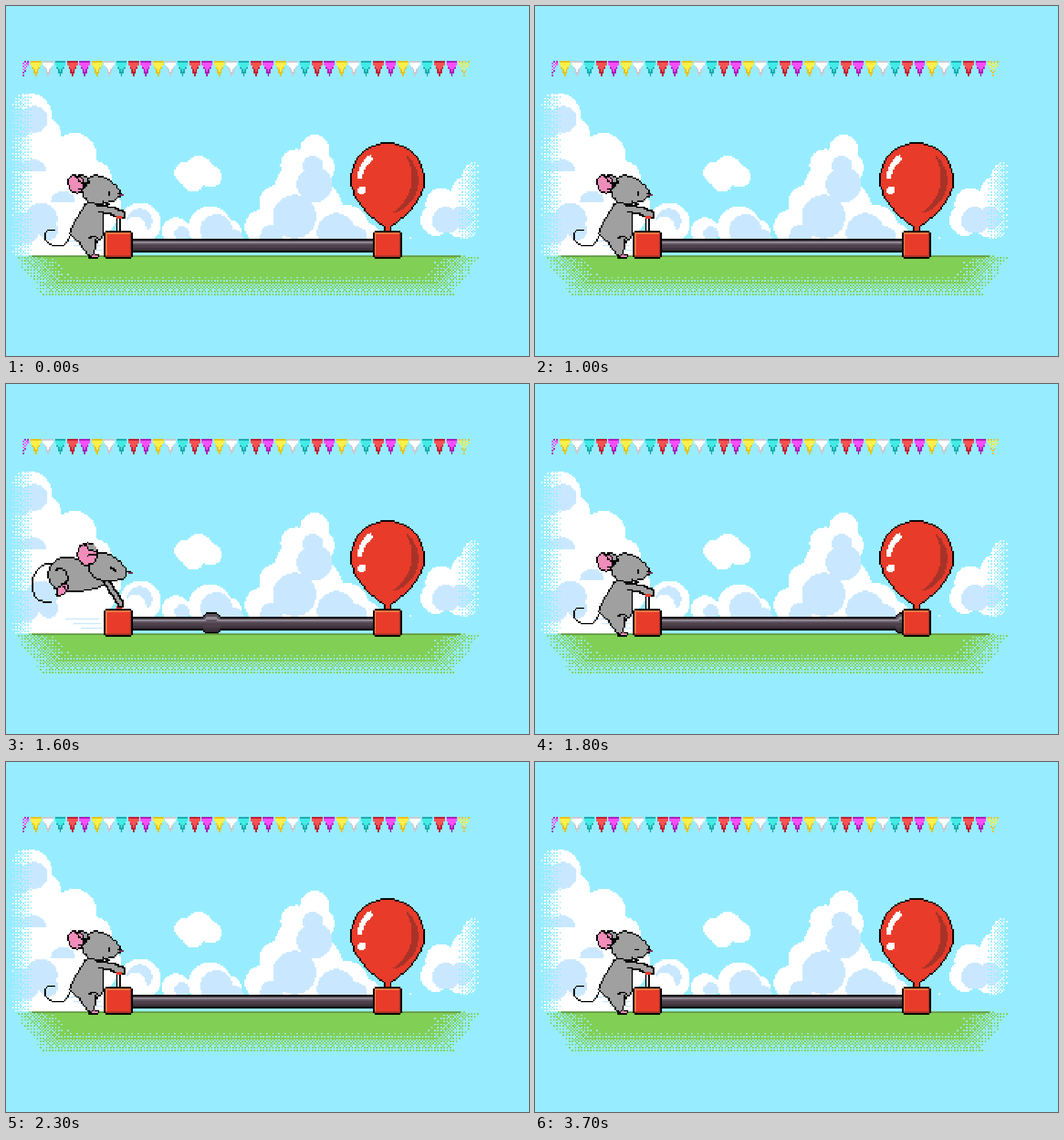
Animation of 915x612 px, one loop 3900 ms. Source, as an HTML page with a canvas:

```html
<!DOCTYPE html>
<html lang="en">
<head>
<meta charset="utf-8">
<title>Mouse and balloon</title>
<style>
html, body { margin: 0; width: 100%; height: 100%; overflow: hidden; background: #97edff; }
canvas { position: absolute; left: 0; top: 0; width: 915px; height: 612.66px; image-rendering: pixelated; }
</style>
</head>
<body>
<canvas id="stage" width="342" height="229"></canvas>
<script>
// Shapes use stage pixels; rect() and the pixel loops use art cells of P stage pixels.
const W = 342, H = 229, P = 915 / W, LOOP = 3900, { PI, sin, cos, abs, min, max, floor, round } = Math;
const SKY = '#97edff', WHITE = '#ffffff', MIST = '#c9e8ff', BLACK = '#000000', GREEN = '#82cf55';
const RED = '#e93b2a', DARK_RED = '#a73328', GREY = '#a0a0a0', PINK = '#f08dba';
const g = document.getElementById('stage').getContext('2d', { willReadFrequently: true });

const clamp = (v, a, b) => max(a, min(b, v));
const mix = (a, b, t) => a + (b - a) * t;
const rad = deg => deg * PI / 180;
const cell = v => floor(v / P);
const parse = s => s.trim().split(/\s+/).map(p => p.split(',').map(Number));

function rect(x, y, w, h, color) {
  g.fillStyle = color;
  g.fillRect(x, y, w, h);
}

// Ordered 4x4 dithering
function dither(x, y, density) {
  const level = (a, b) => 2 * ((a ^ b) & 1) + (b & 1);
  return density > (4 * level(x, y) + level(x >> 1, y >> 1) + .5) / 16;
}

// Catmull-Rom curve through key points
function curve(s, closed) {
  const pts = parse(s), n = pts.length, out = [];
  const at = i => closed ? pts[(i + n) % n] : pts[clamp(i, 0, n - 1)];
  for (let i = 0; i < (closed ? n : n - 1); i++) {
    const [a, b, c, d] = [at(i - 1), at(i), at(i + 1), at(i + 2)];
    for (let t = 0; t < 1; t += .2) {
      out.push([0, 1].map(k => b[k] + .5 * t * (c[k] - a[k] +
        t * (2 * a[k] - 5 * b[k] + 4 * c[k] - d[k] + t * (3 * (b[k] - c[k]) + d[k] - a[k])))));
    }
  }
  return closed ? out : [...out, pts[n - 1]];
}

function place(x, y, cx, cy, dir) {
  return [cx + x * cos(dir) - y * sin(dir), cy + x * sin(dir) + y * cos(dir)];
}

function oval(cx, cy, rx, ry = rx, tilt = 0) {
  return Array.from({ length: 24 }, (_, i) =>
    place(rx * cos(i * PI / 12), ry * sin(i * PI / 12), cx, cy, tilt));
}

// Round at the back, narrowing to a tip at distance len
function drop(cx, cy, r, len, dir, power) {
  const half = [];
  for (let a = 180; a > 90; a -= 7.5) half.push([r * cos(rad(a)), r * sin(rad(a))]);
  for (let u = 0; u <= 1; u += .0625) half.push([u * len, r * max(0, cos(u * PI / 2)) ** power]);
  const mirror = half.slice(1, -1).reverse().map(([x, y]) => [x, -y]);
  return [...half, ...mirror].map(([x, y]) => place(x, y, cx, cy, dir));
}

// Arc band with varying radius and width
function crescent(cx, cy, from, to, radius, width) {
  const side = k => Array.from({ length: 17 }, (_, i) => {
    const t = i / 16, a = rad(mix(from, to, t)), r = radius(t) + k * width(t) / 2;
    return [cx + r * cos(a), cy + r * sin(a)];
  });
  return [...side(1), ...side(-1).reverse()];
}

function fill(pts, color) {
  g.fillStyle = color;
  for (let y = 0; y < H; y++) {
    const sy = (y + .5) * P, hits = [];
    pts.forEach(([x1, y1], i) => {
      const [x2, y2] = pts[(i + 1) % pts.length];
      if (y1 <= sy !== y2 <= sy) hits.push(x1 + (sy - y1) / (y2 - y1) * (x2 - x1));
    });
    hits.sort((a, b) => a - b);
    for (let i = 0; i + 1 < hits.length; i += 2) {
      const a = round(hits[i] / P), b = round(hits[i + 1] / P);
      g.fillRect(a, y, b - a, 1);
    }
  }
}

function stroke(pts, color = BLACK, size = 1) {
  const o = size >> 1;
  g.fillStyle = color;
  for (let i = 0; i + 1 < pts.length; i++) {
    const [ax, ay, bx, by] = [...pts[i], ...pts[i + 1]].map(cell);
    const n = max(abs(bx - ax), abs(by - ay), 1);
    for (let k = 0; k <= n; k++) {
      g.fillRect(round(mix(ax, bx, k / n)) - o, round(mix(ay, by, k / n)) - o, size, size);
    }
  }
}

function outlined(pts, color) {
  fill(pts, color);
  stroke([...pts, pts[0]]);
}

const line = s => stroke(curve(s));

function limb(s, size) {
  const pts = curve(s);
  stroke(pts, BLACK, size + 2);
  stroke(pts, GREY, size);
}

// Union of "x,y,r" discs with a flat bottom, fading at both ends of the scene
function puffs(s, color, bottom) {
  g.fillStyle = color;
  for (const [cx, cy, r] of parse(s)) {
    for (let y = cell(cy - r); y < cell(min(cy + r, bottom)) + 1; y++) {
      for (let x = max(0, cell(cx - r)); x <= cell(cx + r); x++) {
        const sx = (x + .5) * P, sy = (y + .5) * P, fade = min((sx - 8) / 38, (828 - sx) / 36);
        if (Math.hypot(sx - cx, sy - cy) < r && dither(x, y, fade)) g.fillRect(x, y, 1, 1);
      }
    }
  }
}

function clouds() {
  puffs('40,192,40 66,224,30 40,240,55 120,260,38 155,300,29 60,310,90 140,350,60 30,390,75 110,410,75', WHITE, 434);
  puffs('50,198,23 22,206,26', MIST, 228);
  puffs('48,290,22 20,292,22', MIST, 287);
  puffs('100,345,22', MIST, 342);
  puffs('62,372,28 30,390,28 74,392,17', MIST, 413);
  for (let i = 0; i < 3; i++) rect(39 + 5 * i, 153 + 3 * i, 22 - 4 * i, 1, MIST);

  puffs('235,380,36 297,394,24 357,388,38 390,395,22 448,386,30', WHITE, 404);
  puffs('475,345,32 508,278,28 540,250,25 548,282,27 520,320,50 530,360,60 495,385,55 595,388,40 632,402,22', WHITE, 404);
  puffs('234,376,22', MIST, 390);
  puffs('226,387,19', WHITE, 404);
  puffs('308,398,13 368,392,28 400,405,14', MIST, 404);
  puffs('537,280,18 540,312,31 505,368,38 465,402,20 578,396,34 615,402,16', MIST, 404);

  puffs('338,286,24 315,292,20 358,298,19 328,306,19', WHITE, 404);
  puffs('752,374,27 762,346,28 808,328,30 824,298,26 800,370,36', WHITE, 404);
  puffs('770,375,24 796,370,20', MIST, 394);
  rect(264, 151, 1, 1, WHITE);
}

function grass() {
  g.fillStyle = GREEN;
  for (let y = 163; y < 189; y++) {
    for (let x = 0; x < W; x++) {
      const sx = x * P, sy = y * P, inset = max(0, sy - 440) * .7;
      const side = min(sx - 16 - inset, 826 - inset - sx) / 85;
      if (dither(x, y, min(side > 0 ? side + .12 : 0, (513 - sy) / 45))) g.fillRect(x, y, 1, 1);
    }
  }
  rect(17, 163, 280, 1, '#659f49');
}

function bunting() {
  const colors = [['#fff04a', '#e5c21a'], ['#ffffff', '#c9c9cf'], ['#44ebe6', '#19a9aa'],
    ['#f85252', '#bd1c32'], ['#f94ffb', '#a91bb5']];
  for (let i = -1; i < 36; i++) {
    const [main, edge] = colors[(i + 5) % 5];
    for (let r = 0; r < 10; r++) {
      const half = round(3.3 * (1 - r / 9));
      for (let d = -half; d <= half; d++) {
        const x = 19 + 8 * i + d, y = 36 + r, frayed = x < 14 || x > 296;
        if (x < 11 || frayed && !dither(x, y, .5)) continue;
        rect(x, y, 1, 1, !r || r > 6 || r > 3 && abs(d) === half ? edge : main);
      }
    }
  }
}

function pipe(bulge) {
  const tones = ['#5b515b', '#918a94', '#5e535e', '#4d404b', '#4d404b', '#40343e', '#352b34'];
  for (let x = 82; x < 241; x++) {
    const swell = bulge === null ? 0 : clamp(6 - abs(x - cell(bulge)), 0, 3);
    const top = 152 - swell, bottom = 160 + min(swell, 2), inner = bottom - top - 1;
    rect(x, top, 1, bottom - top + 1, BLACK);
    for (let k = 0; k < inner; k++) rect(x, top + 1 + k, 1, 1, tones[floor(k / inner * tones.length)]);
  }
}

function box(x) {
  rect(x + 1, 147, 17, 18, BLACK);
  rect(x, 148, 19, 16, BLACK);
  rect(x + 1, 148, 17, 16, DARK_RED);
  rect(x + 1, 148, 16, 15, '#f67a45');
  rect(x + 2, 149, 15, 14, RED);
}

function balloon(big) {
  const cx = 667.4, cy = big ? 263.5 : 303.6, r = big ? 104.3 : 64.2;
  const [end, w0, w1] = big ? [264, .18, .05] : [236, .13, .16];
  outlined(drop(cx, cy, r, 390 - cy, PI / 2, .85), RED);
  rect(247, 144, 5, 4, BLACK);
  rect(248, 142, 3, 6, RED);
  fill(crescent(cx, cy, -52, 85, t => r * (.83 + .1 * t - .48 * t * (1 - t)),
    t => r * .19 * sin(PI * t) ** .7), DARK_RED);
  fill(crescent(cx, cy, 180, end, () => r * .75, t => r * mix(w0, w1, t)), WHITE);
  fill(oval(cx + .75 * r * cos(rad(158)), cy + .75 * r * sin(rad(158)), .11 * r), WHITE);
}

function nose(x, y) {
  rect(x, y, 3, 1, BLACK);
  rect(x + 1, y + 1, 3, 1, '#6f2c50');
}

function face(mood) {
  if (mood === 'blink') rect(65, 122, 3, 1, BLACK);
  else rect(67, 121, 1, 3, BLACK);
  if (mood === 'wow') line('175,322 179,319 184,322');
  if (mood === 'wow' || mood === 'smile') line('169,339 177,345 186,339');
}

function standing(mood) {
  rect(72, 138, 3, 9, BLACK);
  rect(73, 138, 1, 9, WHITE);
  line('112,402 103,417 90,419 77,416 68,406 71,394 83,391');
  outlined(oval(153, 437, 8, 4), PINK);
  outlined(curve('142,345 128,366 112,396 126,412 144,434 153,433 158,413 168,403 170,372 158,344', true), GREY);
  line('146,406 152,402 158,404 156,415');
  limb('162,354 182,357 202,365', 3);
  fill(oval(156, 355, 9, 6), GREY);
  rect(72, 137, 4, 2, RED);
  outlined(drop(158, 321, 24.5, 44, .2, .7), GREY);
  line('169,340 173,345 180,346');
  nose(73, 122);
  outlined(oval(133, 304, 12, 8, .3), GREY);
  outlined(oval(122, 311, 13, 16, -.4), PINK);
  line('123,297 130,307 145,310');
  line('137,308 139,315 128,321');
  face(mood);
}

function leaping() {
  line('79,381 66,381 50,370 46,348 54,324 69,315 80,314');
  rect(72, 145, 4, 2, RED);
  outlined(drop(104, 333, 30, 78, .05, .5), GREY);
  line('86,325 95,323 106,330 107,345 98,349');
  outlined(oval(98, 360, 13, 7, -.9), PINK);
  line('98,352 104,356');
  limb('172,342 187,362 203,387', 2);
  fill(oval(167, 339, 8, 5, .5), GREY);
  outlined(drop(168, 318, 23.5, 46, .35, .6), GREY);
  nose(79, 122);
  line('184,321 188,323 192,327');
  outlined(oval(142, 297, 17, 19, .3), PINK);
  fill(oval(151, 286, 8, 5, .6), GREY);
  line('138,280 146,289 160,293');
  line('144,300 152,297 159,299');
}

function moodAt(t) {
  if (t >= 800 && t < 1000 || t >= 2500 && t < 2700 || t >= 3700) return 'blink';
  if (t >= 2700) return t < 3200 ? 'wow' : 'smile';
  return 'calm';
}

rect(0, 0, W, H, SKY);
clouds();
grass();
bunting();
const backdrop = g.getImageData(0, 0, W, H);

function paint(mood, leap, bulge, big) {
  g.putImageData(backdrop, 0, 0);
  pipe(bulge);
  balloon(big);
  box(64);
  box(240);
  leap ? leaping() : standing(mood);
}

let shown = '';
function tick(now) {
  const t = now % LOOP, pumping = t >= 1500 && t < 1900;
  const bulge = pumping ? 219 + 142 * floor((t - 1500) / 100) : null;
  const state = [moodAt(t), t >= 1500 && t < 1700, bulge, t >= 1900 && t < 2300];
  if (String(state) !== shown) {
    paint(...state);
    shown = String(state);
  }
  requestAnimationFrame(tick);
}
tick(0);
</script>
</body>
</html>
```
